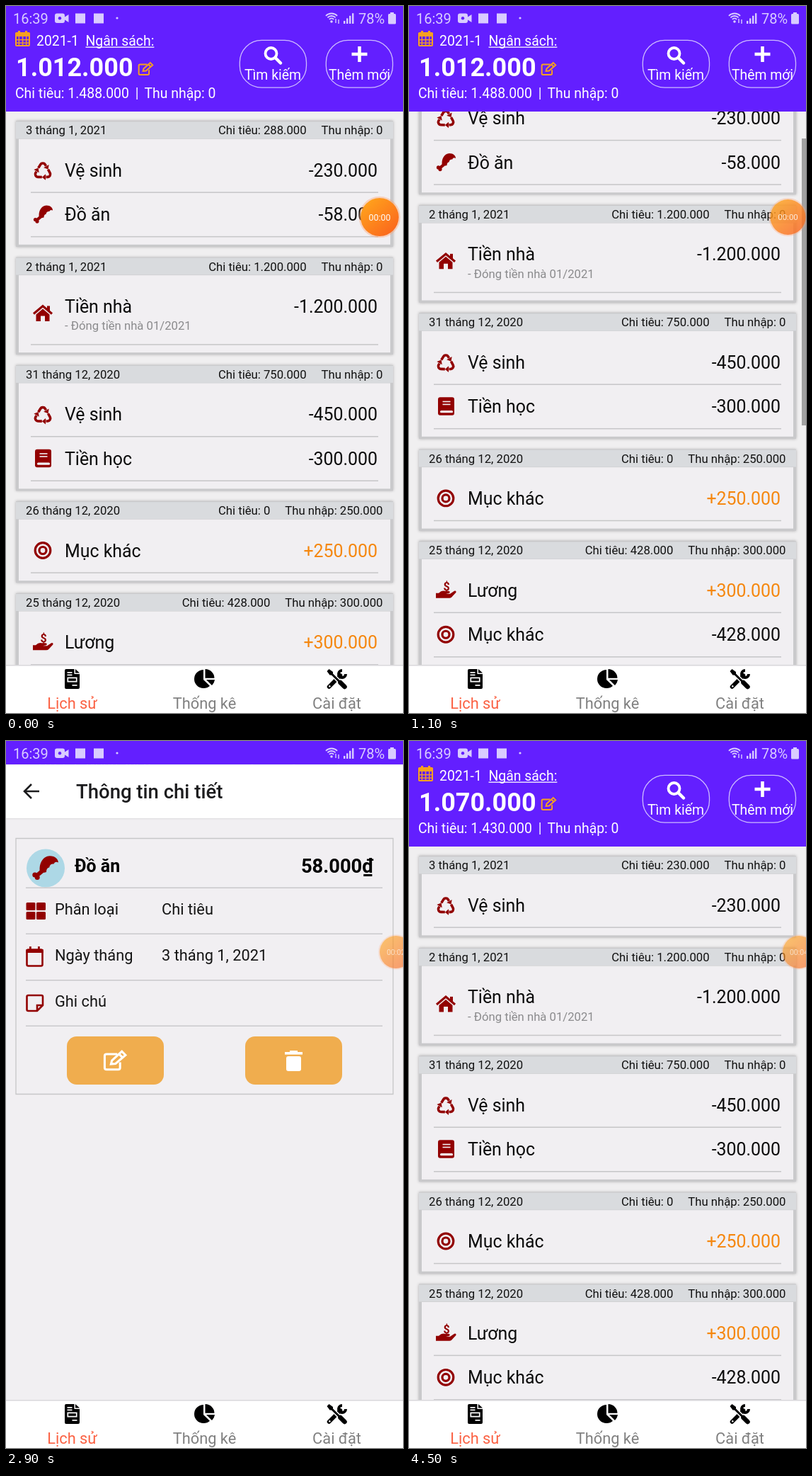
Animation of 561 by 998 pixels, one loop 5000 ms. Source, as an HTML page with a canvas:

```html
<!DOCTYPE html>
<html lang="vi">
<head>
<meta charset="utf-8">
<title>Sổ chi tiêu</title>
<style>
html, body { margin: 0; width: 100%; height: 100%; overflow: hidden; background: #f1eff2; }
canvas { display: block; width: 561px; height: 998px; font-family: Roboto, sans-serif; }
</style>
</head>
<body>
<canvas id="stage" width="561" height="998"></canvas>
<script>
const ctx = document.getElementById('stage').getContext('2d');
const W = 561, LOOP = 5000, TOP = 33, BOTTOM = 931, SCREEN = BOTTOM - TOP, LIST_TOP = 149;
const PURPLE = '#631fff', RED = '#920000', PAPER = '#f1eff2', ORANGE = '#f5870f', GOLD = '#f7a01f';

// ---- helpers
const clamp = v => Math.max(0, Math.min(1, v));
const span = (t, a, b) => clamp((t - a) / (b - a));
const smooth = v => v * v * (3 - 2 * v);
const mix = (a, b, v) => a + (b - a) * v;

function reveal(x) {
  const cubic = (s, a, b) => 3 * s * (1 - s) ** 2 * a + 3 * s * s * (1 - s) * b + s ** 3;
  let lo = 0, hi = 1;
  for (let i = 0; i < 24; i++) {
    const mid = (lo + hi) / 2;
    if (cubic(mid, 0.20833, 0.25) < x) lo = mid; else hi = mid;
  }
  return x <= 0 ? 0 : x >= 1 ? 1 : cubic(lo, 0.82, 1);
}

function rect(x, y, w, h, color) {
  ctx.fillStyle = color;
  ctx.fillRect(x, y, w, h);
}
function box(x, y, w, h, r, fill, line, width = 1) {
  ctx.beginPath();
  ctx.roundRect(x, y, w, h, r);
  if (fill) { ctx.fillStyle = fill; ctx.fill(); }
  if (line) { ctx.strokeStyle = line; ctx.lineWidth = width; ctx.stroke(); }
}
function text(str, x, y, size, color, align = 'left', weight = 400) {
  ctx.font = `${weight} ${size}px Roboto, sans-serif`;
  ctx.textAlign = align;
  ctx.fillStyle = color;
  ctx.fillText(str, x, y);
  return ctx.measureText(str).width;
}
function shape(d, color) {
  ctx.fillStyle = color;
  ctx.fill(new Path2D(d), 'evenodd');
}
function line(d, color, width, cap = 'butt') {
  ctx.strokeStyle = color;
  ctx.lineWidth = width;
  ctx.lineCap = cap;
  ctx.lineJoin = cap === 'round' ? 'round' : 'miter';
  ctx.stroke(new Path2D(d));
}
function disc(x, y, r, color) {
  ctx.beginPath();
  ctx.arc(x, y, r, 0, 7);
  ctx.fillStyle = color;
  ctx.fill();
}
function ring(x, y, r, width, color, from = 0, to = Math.PI * 2) {
  ctx.beginPath();
  ctx.arc(x, y, r, from, to);
  ctx.strokeStyle = color;
  ctx.lineWidth = width;
  ctx.lineCap = 'butt';
  ctx.stroke();
}
function at(x, y, draw, scale = 1) {
  ctx.save();
  ctx.translate(x, y);
  ctx.scale(scale, scale);
  draw();
  ctx.restore();
}

// ---- icons, each centred on the origin
const icons = {
  recycle() {
    ctx.translate(0, 2);
    for (let i = 0; i < 3; i++) {
      line('M-6.3-5L-3.2-10Q-2.200-11.600-0.500-11.600H0.500Q2.200-11.600 3.200-10L4.500-7.800', RED, 3.6);
      shape('M8.600-9.600L7.600-3L1.200-5.400Z', RED);
      ctx.rotate(Math.PI * 2 / 3);
    }
  },
  drumstick() {
    shape('M-5 5C-7-4-2-12.500 5-12.500C11-12.500 14-9 14-5.500C12-6.800 10-6.300 9.300-4C7-4.500 4.800-3 4.600-0.300C2.500 0 1.500 2 1.500 4.500C-0.500 5.200-3 5.500-5 5Z', RED);
    line('M-3 3.500L-9 8.500', RED, 4.2);
    disc(-10.5, 7.4, 2.6, RED);
    disc(-8, 10, 2.6, RED);
  },
  home() {
    line('M-13 1L0-9.800L13 1', RED, 3.2);
    rect(6, -10, 4, 7, RED);
    shape('M-9.500 2L0-6L9.500 2V11.500H3V4H-3V11.500H-9.500Z', RED);
  },
  book() {
    box(-11, -13, 23, 25.5, 3, RED);
    rect(-4.5, -7.5, 11, 1.6, PAPER);
    rect(-4.5, -3.5, 11, 1.6, PAPER);
    box(-8, 5.8, 18, 3.3, 1.5, PAPER);
  },
  target() {
    ring(0, 0, 10.8, 3.2, RED);
    ring(0, 0, 5, 3.2, RED);
  },
  hand() {
    text('$', 1, 0, 16, RED, 'center', 700);
    shape('M-14 4H-10Q-6 0-2 1H4Q7 2 5 4L0 5H6L12 1Q15 0 14.500 3L8 10Q7 11 5 11H-14Z', RED);
  },
  invoice() {
    shape('M-10.500-12Q-10.500-14-8.500-14H3V-7H10.500V12Q10.500 14 8.500 14H-8.500Q-10.500 14-10.500 12Z', '#000');
    shape('M4.500-14L10.500-8.500H4.500Z', '#000');
    rect(-7, -10, 7, 1.7, '#fff');
    rect(-7, -6.5, 7, 1.7, '#fff');
    box(-6.2, -1.7, 12.4, 5.4, 0, null, '#fff', 1.7);
    rect(0, 8, 7, 1.7, '#fff');
  },
  pie() {
    shape('M-1.500-13A13 13 0 0 0-1.500 13A13 13 0 0 0 7.500 9.800L-1.500 1Z', '#000');
    shape('M1-14A13 13 0 0 1 14-1.300H1Z', '#000');
    shape('M2.500 1H14.500A13 13 0 0 1 10.500 9Z', '#000');
  },
  tools() {
    line('M-11 11L5-5', '#000', 5.5, 'round');
    ring(7.5, -7, 5, 4, '#000', 0, 4.7);
    disc(-10.2, 10.2, 1.2, '#fff');
    line('M-9-9L5 5', '#fff', 6);
    line('M-10-10L4 4', '#000', 3);
    shape('M-14-11L-11-14L-5.500-10V-5.500H-10Z', '#000');
    line('M5 5L11 11', '#000', 6.5, 'round');
  },
  pencil(color, width) {
    line('M3-7H-9Q-11-7-11-5V8Q-11 10-9 10H4Q6 10 6 8V2', color, width);
    line('M-4 4L-3 0L8-10L12-6L1 3.500Z', color, width);
    line('M5-7L9-3', color, width);
  }
};

// ---- list data
const VS = ['recycle', 'Vệ sinh'], MK = ['target', 'Mục khác'], TH = ['book', 'Tiền học'];
const food = { icon: 'drumstick', label: 'Đồ ăn', amount: '-58.000' };
const row = ([icon, label], amount, note) => ({ icon, label, amount, note });
const day = (date, spent, earned, ...rows) => ({ date, spent, earned, rows });
const older = [
  day('2 tháng 1, 2021', '1.200.000', '0', row(['home', 'Tiền nhà'], '-1.200.000', '- Đóng tiền nhà 01/2021')),
  day('31 tháng 12, 2020', '750.000', '0', row(VS, '-450.000'), row(TH, '-300.000')),
  day('26 tháng 12, 2020', '0', '250.000', row(MK, '+250.000')),
  day('25 tháng 12, 2020', '428.000', '300.000', row(['hand', 'Lương'], '+300.000'), row(MK, '-428.000')),
  day('11 tháng 12, 2020', '200.000', '0', row(TH, '-200.000'))
];
const cleaning = row(VS, '-230.000');
const before = [day('3 tháng 1, 2021', '288.000', '0', cleaning, food), ...older];
const after = [day('3 tháng 1, 2021', '230.000', '0', cleaning), ...older];
const rowHeight = r => r.note ? 85 : 62.5;

function drawCard(y, card, pressed) {
  const pitch = 67.3 + card.rows.reduce((sum, r) => sum + rowHeight(r), 0);
  const bottom = y + pitch - 14.8;
  ctx.save();
  ctx.shadowColor = 'rgba(0,0,0,.28)';
  ctx.shadowBlur = 4;
  rect(14, y, 533, bottom - y, '#c9c9cb');
  ctx.restore();
  rect(14, y + 1, 533, 24, '#d9dbde');
  rect(18, y + 25.5, 525, bottom - y - 28.5, PAPER);
  text(card.date, 28, y + 19, 16.7, '#111');
  const width = text('Thu nhập: ' + card.earned, 532.5, y + 19, 16.7, '#111', 'right');
  text('Chi tiêu: ' + card.spent, 511.5 - width, y + 19, 16.7, '#111', 'right');

  let top = y + 38.3;
  for (const r of card.rows) {
    ctx.save();
    if (r === food) ctx.globalAlpha = pressed;
    at(52, top + (r.note ? 40.5 : 31), icons[r.icon]);
    text(r.label, 83, top + 40, 24.9, '#0c0c0c');
    text(r.amount, 525, top + 40, 24.9, r.amount[0] === '+' ? ORANGE : '#0c0c0c', 'right');
    if (r.note) text(r.note, 83, top + 64.5, 16.7, '#8b8b8d');
    ctx.restore();
    top += rowHeight(r);
    rect(35, top - 0.7, 491, 1.5, '#c6c6c8');
  }
  return pitch;
}

function drawHeader(balance, spent) {
  const size = 19.4;
  rect(0, 0, W, LIST_TOP, PURPLE);
  box(14, 38, 19, 18, 1, null, GOLD, 2);
  rect(13, 38, 21, 5, GOLD);
  for (const x of [18.3, 23.5, 28.7]) rect(x - 0.6, 43, 1.3, 13, GOLD);
  for (const y of [47, 51.5]) rect(14, y, 19, 1.3, GOLD);
  rect(17, 35, 3, 5, GOLD);
  rect(27, 35, 3, 5, GOLD);
  text('2021-1', 43, 55.5, size, '#fff');
  const width = text('Ngân sách:', 112.5, 55.5, size, '#fff');
  rect(112.5, 57.5, width, 1.3, '#fff');
  text(balance, 14, 99, 36, '#fff', 'left', 700);
  at(197, 88.5, () => icons.pencil(GOLD, 2.3), 0.85);
  text('Chi tiêu: ' + spent, 13, 129.6, size, '#fff');
  text('|', 185, 129.6, size, '#fff', 'center');
  text('Thu nhập: 0', 296.5, 129.6, size, '#fff', 'right');

  for (const x of [330, 452]) box(x + 0.3, 48.4, 94.2, 66.8, 31, null, '#cdbbff', 1.3);
  ring(374.5, 67, 8, 3.8, '#fff');
  line('M380.500 73L388 80.500', '#fff', 4.5, 'round');
  line('M499.500 57V79M488.500 68H510.500', '#fff', 4.6);
  text('Tìm kiếm', 377, 103.6, size, '#fff', 'center');
  text('Thêm mới', 499.5, 103.6, size, '#fff', 'center');
}

function drawList(t) {
  const updated = t >= 4100;
  const scroll = 209 * (smooth(span(t, 0, 600)) - smooth(span(t, 800, 1300)));
  const pressed = t < 2600 ? mix(1, 0.2, span(t, 1800, 2100)) : 1;
  ctx.save();
  ctx.beginPath();
  ctx.rect(0, LIST_TOP, W, BOTTOM - LIST_TOP);
  ctx.clip();
  rect(0, LIST_TOP, W, BOTTOM - LIST_TOP, '#f0eff0');
  let y = 162.3 - scroll;
  for (const card of updated ? after : before) y += drawCard(y, card, pressed);
  const barAlpha = t < 100 ? 0 : 1 - span(t, 1200, 2100);
  rect(555, LIST_TOP + scroll * 0.517, 6, 405, `rgba(125,125,125,${0.68 * barAlpha})`);
  ctx.restore();
  drawHeader(updated ? '1.070.000' : '1.012.000', updated ? '1.430.000' : '1.488.000');
}

function drawDetail(t) {
  rect(0, TOP, W, SCREEN, PAPER);
  ctx.save();
  ctx.shadowColor = 'rgba(0,0,0,.25)';
  ctx.shadowBlur = 3;
  rect(0, TOP, W, 76, '#fff');
  ctx.restore();
  line('M47 71H27M36 61L26 71L36 81', '#1c1c1e', 2.6);
  text('Thông tin chi tiết', 99, 81, 27.5, '#1c1c1e', 'left', 500);

  box(14, 137.5, 533, 361, 0, null, '#c6c6c8', 1.3);
  disc(56, 179.5, 27, '#add8e6');
  at(55, 179, icons.drumstick, 1.35);
  text('Đồ ăn', 97, 185, 24.9, '#000', 'left', 700);
  text('58.000₫', 519, 186, 27.3, '#000', 'right', 700);
  for (const y of [207, 272, 337.5, 402]) rect(28, y - 0.5, 504, 1.4, '#c6c6c8');

  for (const x of [28.5, 43]) for (const y of [228, 241]) box(x, y, 13, 11, 1.5, RED);
  box(29.5, 294.5, 22, 23, 2, null, RED, 2.6);
  rect(28.5, 294, 24, 5, RED);
  rect(33, 290, 2.8, 6, RED);
  rect(45, 290, 2.8, 6, RED);
  line('M52 373L44 381H31.500Q29.500 381 29.500 379V361Q29.500 359 31.500 359H50Q52 359 52 361ZM44 381V373H52', RED, 2.6);

  const fields = [['Phân loại', 'Chi tiêu'], ['Ngày tháng', '3 tháng 1, 2021'], ['Ghi chú', '']];
  fields.forEach(([name, value], i) => {
    text(name, 69, 245 + i * 65, 21.8, '#151515');
    text(value, 220, 245 + i * 65, 21.8, '#151515');
  });

  box(86, 417, 137, 68, 14, '#f0ad4e');
  at(153.5, 451, () => icons.pencil('#fff', 2.4), 1.28);
  ctx.save();
  if (t >= 3400) ctx.globalAlpha = 0.2;
  box(338, 417, 137, 68, 14, '#f0ad4e');
  box(396, 445, 21, 21, 3, '#fff');
  rect(394, 439, 25, 3.6, '#fff');
  rect(401, 437, 11, 3, '#fff');
  ctx.restore();
}

function drawStatus() {
  const ink = '#d9ccff';
  rect(0, 0, W, TOP, PURPLE);
  text('16:39', 10, 25, 20, ink);
  box(69, 10.5, 14, 13.5, 3, ink);
  shape('M83 15.500L88.500 12V23L83 19.500Z', ink);
  disc(76, 17.3, 2.2, PURPLE);
  rect(98, 10.5, 14, 14, ink);
  rect(124, 10.5, 14, 14, ink);
  disc(157, 17, 1.6, ink);
  for (const r of [4.5, 8, 11.5]) ring(460, 22, r, 1.8, ink, -2.35, -0.79);
  disc(460, 22, 1.8, ink);
  line('M466 18V24M470 19V25', ink, 1.4);
  for (let i = 0; i < 4; i++) rect(477 + i * 4, 21 - i * 3.6, 2.4, 4 + i * 3.6, ink);
  text('78%', 498, 25, 20, ink);
  box(540, 11, 11, 14.5, 1.5, ink);
  rect(543, 9, 5, 3, ink);
}

function drawTabs() {
  rect(0, BOTTOM, W, 67, '#fff');
  rect(0, BOTTOM - 1, W, 1.5, '#d9d8db');
  [['invoice', 'Lịch sử', '#fb6244'], ['pie', 'Thống kê', '#808080'], ['tools', 'Cài đặt', '#808080']]
    .forEach(([icon, label, color], i) => {
      const x = 93.5 + i * 187;
      at(x, 950, icons[icon]);
      text(label, x, 991.5, 21.8, color, 'center');
    });
}

function drawBubble(t) {
  const small = span(t, 1000, 1200);
  const x = 528 + 15 * small + 8 * span(t, 1400, 1700);
  const seconds = [1200, 2300, 3400, 4500].filter(s => t >= s).length;
  ctx.save();
  ctx.globalAlpha = mix(1, 0.62, small);
  at(x, 298, () => {
    ring(0, 0, 28, 2.4, 'rgba(255,160,110,.4)');
    const glow = ctx.createLinearGradient(-18, -20, 18, 20);
    glow.addColorStop(0, '#ff9f1c');
    glow.addColorStop(1, '#fb6a1d');
    disc(0, 0, 27, glow);
    text('00:0' + seconds, 0, 4.5, 12.4, '#fff', 'center');
  }, mix(1, 0.85, small));
  ctx.restore();
}

function draw(t) {
  const open = reveal(span(t, 2550, 2915)) - reveal(span(t, 3700, 4065));
  ctx.save();
  ctx.translate(0, -0.02 * SCREEN * open);
  drawList(t);
  ctx.restore();
  if (open > 0) {
    const hidden = (1 - open) * SCREEN;
    rect(0, TOP, W, SCREEN, `rgba(0,0,0,${0.1 * clamp(open / 0.36)})`);
    ctx.save();
    ctx.beginPath();
    ctx.rect(0, TOP + hidden, W, SCREEN - hidden);
    ctx.clip();
    ctx.translate(0, hidden * 0.041);
    drawDetail(t);
    ctx.restore();
  }
  drawStatus();
  drawTabs();
  drawBubble(t);
}

const start = performance.now();
function tick() {
  const t = (performance.now() - start) % LOOP;
  draw(Math.floor(t / 100) * 100);
  requestAnimationFrame(tick);
}
tick();
</script>
</body>
</html>
```
